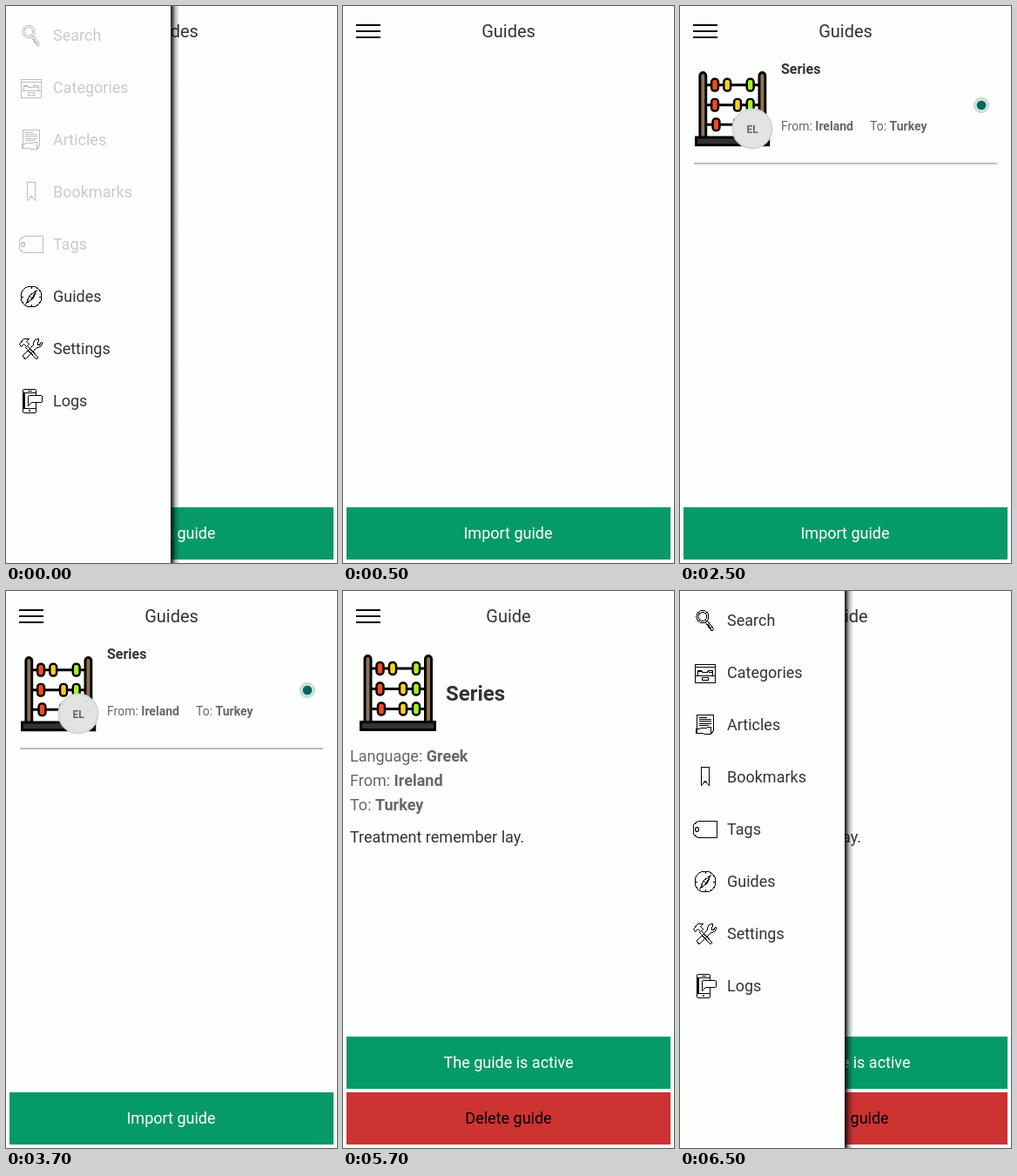
Write an HTML page that moves like this. It is 380 px wide and 640 px high and loops after 8000 ms.

```html
<!DOCTYPE html>
<html lang="en">
<head>
<meta charset="utf-8">
<style>
html, body { margin: 0; width: 100%; height: 100%; overflow: hidden; background: #fdfffc; }
svg { display: block; width: 380px; height: 640px; font: 18px Roboto, sans-serif; fill: #333; }
.mid { text-anchor: middle; }
.title { font-size: 20px; }
.soft { fill: #666; }
b, .b { font-weight: 700; }
.icon { fill: none; stroke: #000; shape-rendering: crispEdges; }
.off { opacity: .25; }
</style>
</head>
<body>
<svg viewBox="0 0 380 640">
  <defs>
    <linearGradient id="shade">
      <stop offset="0" stop-opacity=".88"/>
      <stop offset=".2" stop-opacity=".72"/>
      <stop offset=".5" stop-opacity=".3"/>
      <stop offset="1" stop-opacity="0"/>
    </linearGradient>
    <g id="abacus" stroke="#000" stroke-width="3"></g>
  </defs>

  <path d="M15 22h28M15 29h28M15 36h28" stroke="#000" stroke-width="2"/>

  <g id="list">
    <text class="mid title" x="190" y="36">Guides</text>
    <rect x="4" y="576" width="372" height="60" fill="#069a66"/>
    <text class="mid" x="189.5" y="612" fill="#fff">Import guide</text>
  </g>

  <g id="entry">
    <use href="#abacus" transform="translate(17 75) scale(.98) translate(-19 -73)"/>
    <circle cx="83" cy="141" r="22.5" fill="#e2e4e1" stroke="#d3d5d2" stroke-width="2"/>
    <text class="mid b soft" x="83" y="146" font-size="12">EL</text>
    <text class="b" x="116" y="78" font-size="16">Series</text>
    <g class="soft" font-size="14">
      <text x="116" y="143">From: <tspan class="b">Ireland</tspan></text>
      <text x="218" y="143">To: <tspan class="b">Turkey</tspan></text>
    </g>
    <circle cx="346" cy="114" r="8.5" fill="#cfe3de" stroke="#b9d3cd"/>
    <circle cx="346" cy="114" r="5.3" fill="#04685a"/>
    <path d="M16 181h348" stroke="#bbbdba" stroke-width="2"/>
  </g>

  <g id="detail">
    <text class="mid title" x="190" y="36">Guide</text>
    <use href="#abacus"/>
    <text class="b" x="118" y="126" font-size="24">Series</text>
    <g class="soft">
      <text x="8" y="196">Language: <tspan class="b">Greek</tspan></text>
      <text x="8" y="224">From: <tspan class="b">Ireland</tspan></text>
      <text x="8" y="252">To: <tspan class="b">Turkey</tspan></text>
    </g>
    <text x="8" y="289">Treatment remember lay.</text>
    <rect x="4" y="512" width="372" height="60" fill="#069a66"/>
    <text class="mid" x="190" y="548" fill="#fff">The guide is active</text>
    <rect x="4" y="576" width="372" height="60" fill="#cc3331"/>
    <text class="mid" x="190" y="612" fill="#000">Delete guide</text>
  </g>

  <g id="drawer">
    <rect x="189" width="10" height="640" fill="url(#shade)"/>
    <rect width="189" height="640" fill="#fdfffc"/>
  </g>
</svg>
<script>
const $ = id => document.getElementById(id);

// Abacus
const post = x => `<rect x="${x}" y="74.5" width="7" height="80" rx="3.5" fill="#8c7355"/>`;
const bead = (x, y, color) =>
  `<rect x="${x - 4}" y="${y - 7}" width="8" height="14" rx="3.5" fill="${color}" stroke-width="2.5"/>`;
const row = (y, red, yellow) => `<path d="M32 ${y}h62"/>` +
  bead(red, y, '#fa4a1c') + bead(yellow, y, '#fcd21c') + bead(84, y, '#a8f02c');
$('abacus').innerHTML = row(89, 42.5, 57) + row(112.5, 42.5, 69) + row(135.5, 44, 69) +
  post(25) + post(94.5) + '<rect x="20.5" y="150.5" width="85" height="9" fill="#333"/>';

// Menu: each icon is drawn around its row's centre
const menu = {
  Search: `<circle cx="26" cy="-4.5" r="7"/><circle cx="26" cy="-4.5" r="5"/>
    <path d="M29.5 2.5l2-2 7 9-1.500 2-1.500-.5zM32 4l4 6"/>`,
  Categories: `<path d="M17.500-9.500h23v21h-23zM17.500-6.500h23M20.500 2.500v-5h4l1 2h6l1-2h5v5M17.500 3.500h23M25.500 5.500h7v3h-7zM20-1.500h4M33-.5h4"/>`,
  Articles: `<path d="M19.500 8.500v-20h19v18l-3 4-17-1zM18.500 9.500v-5l17-2v7M22-8.500h9M22-6.500h14M22-4.500h14M22-1.500h14M22 .5h11"/>`,
  Bookmarks: `<path d="M24.500-11.500h9v21l-4.500-5-4.500 5z"/>`,
  Tags: `<path d="M15.500-5.500l5-4h22v19h-22l-5-4z"/><circle cx="19.500" cy="0" r="2.300"/>`,
  Guides: `<circle cx="29" cy="0" r="12"/><path d="M35-7l-4 9-8 6 4-9z"/>
    <path d="M35-7l-8 6 3 3zM29-11v2M29 9v2M18 0h2M38 0h2"/>`,
  Settings: `<path d="M15.500-5.500l5-6h6l-3 3 3 3-3 3-3-3-3 3zM24-4l13 14-2 2-13-14
    M36-5l2-6c-4-1-7 2-6 6l-13 13 3 4 14-14c4 1 6-3 5-6l-3 4zM19 8l3 3"/>`,
  Logs: `<rect x="19.500" y="-13.500" width="15" height="27" rx="2"/>
    <path d="M34 8.500h-13v-18h13M25-11.500h5M26 11h2" stroke-width="1.500"/>
    <path d="M26.500-6.500h14l1 1v6l-1 1h-11l-4 4v-11z" fill="#fdfffc"/>`
};
$('drawer').innerHTML += Object.entries(menu).map(([name, icon], i) =>
  `<g class="${i < 5 ? 'item' : ''}"><g class="icon" transform="translate(0 ${34 + 60 * i})">${icon}</g>
  <text x="54" y="${40 + 60 * i}">${name}</text></g>`).join('');
const items = document.querySelectorAll('.item');

const show = (id, on) => $(id).style.display = on ? '' : 'none';
function draw(now) {
  const t = now % 8000;
  show('list', t < 4500);
  show('entry', t >= 2500 && t < 4500);
  show('detail', t >= 4500);
  show('drawer', t < 500 || t >= 6500);
  items.forEach(e => e.classList.toggle('off', t < 500));
}
const start = performance.now();
function tick() {
  draw(performance.now() - start);
  requestAnimationFrame(tick);
}
tick();
</script>
</body>
</html>
```
